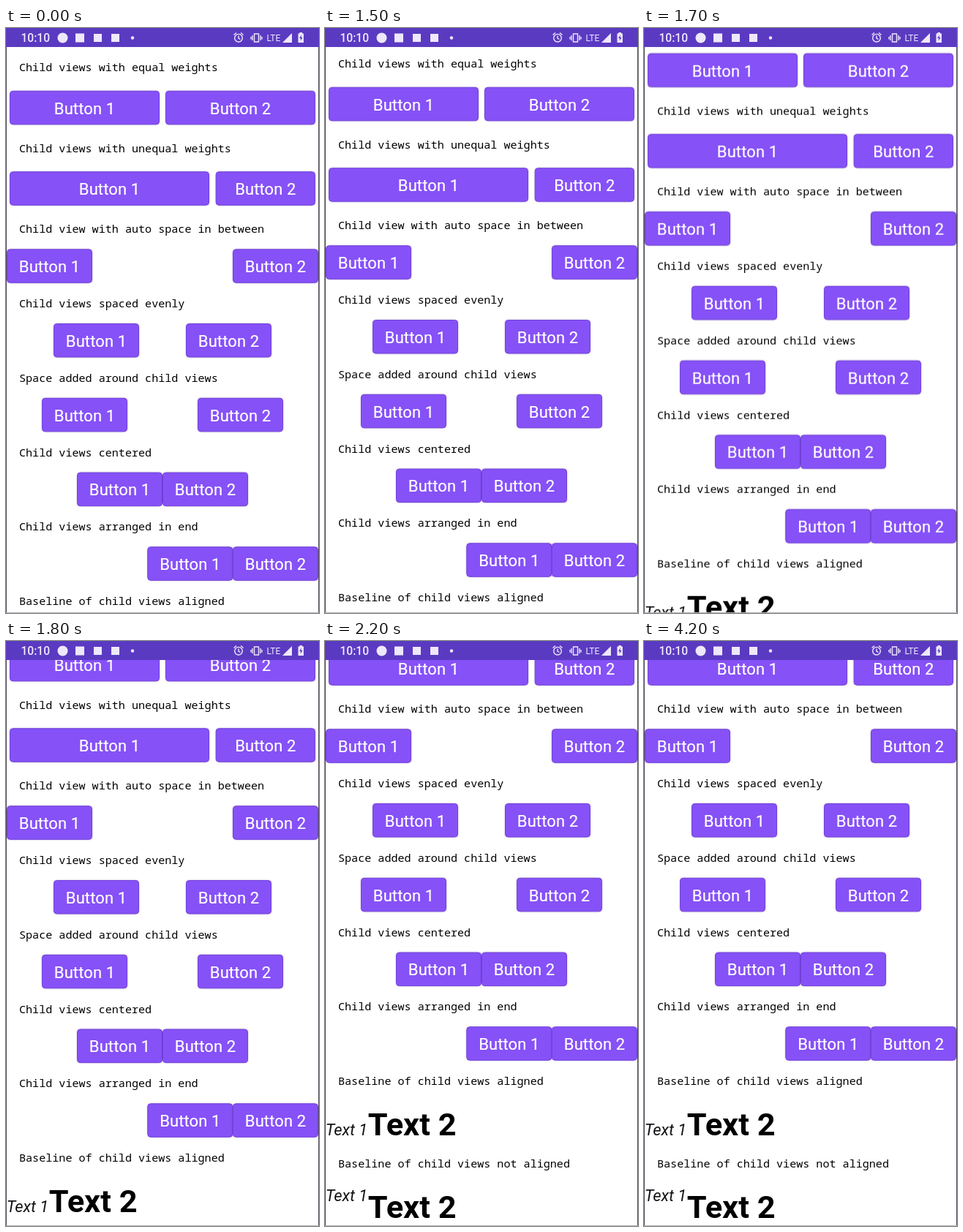
An HTML page that plays this animation: 428x800 px, repeating every 4300 ms.

```html
<!DOCTYPE html>
<html lang="en">
<head>
<meta charset="utf-8">
<title>Row layouts</title>
<style>
html, body { margin: 0; width: 100%; height: 100%; overflow: hidden; background: #fff; }
svg { display: block; }
.label { font: 500 15.1px "Noto Sans Mono", monospace; fill: #000; }
.button rect { fill: #8651f7; stroke: #7241da; filter: drop-shadow(0 .6px .8px rgba(60, 30, 120, .3)); }
.button text { font: 22px Roboto, sans-serif; letter-spacing: .1px; fill: #fff; stroke: #fff; stroke-width: .2; text-anchor: middle; }
.thin { font: italic 21.8px Roboto, sans-serif; fill: #111; }
.bold { font: bold 43.4px Roboto, sans-serif; fill: #000; }
.status { fill: #eee8fb; font-family: Roboto, sans-serif; }
.line { fill: none; stroke: #eee8fb; stroke-width: 1.4; }

#page { animation: scroll 4.3s step-end infinite; }
@keyframes scroll {
  0% { transform: translateY(0); }
  34.8% { transform: translateY(-5px); }
  37.2% { transform: translateY(-25.6px); }
  39.5% { transform: translateY(-51.3px); }
  41.8% { transform: translateY(-77px); }
  44.1% { transform: translateY(-127px); }
  44.1% { transform: translateY(-102px); }
  46.5% { transform: translateY(-127px); }
  48.8% { transform: translateY(-156px); }
  51.1%, 100% { transform: translateY(-182px); }
}
</style>
</head>
<body>
<svg width="428" height="800" viewBox="0 0 428 800">
  <rect width="428" height="800" fill="#fff"/>
  <g id="page"></g>
  <path d="M.5 26V800M427.5 26V800" stroke="#55505c"/>
  <path d="M0 799.5H428" stroke="#b5b2ba"/>

  <rect width="428" height="26" fill="#5b3ac2"/>
  <g class="status">
    <text x="20.5" y="19" font-size="15.6" font-weight="500">10:10</text>
    <circle cx="77.5" cy="13.5" r="7"/>
    <rect x="95" y="7.5" width="12" height="12"/>
    <rect x="120" y="8" width="11" height="11"/>
    <rect x="144" y="8" width="11" height="11"/>
    <circle cx="173" cy="13.5" r="2.2"/>
    <text x="356.5" y="18" font-size="12">LTE</text>
    <path d="M391 7V20H378Z"/>
    <path d="M401.5 7.5V6H405V7.5H407V20H399.5V7.5Z"/>
    <path d="M404 9.5L401 14H403L402.6 17.5L405.6 13H403.6Z" fill="#5b3ac2"/>
  </g>
  <g class="line">
    <circle cx="318" cy="13.7" r="5.3"/>
    <path d="M318 10.5V14L320.5 15.5M311.5 9.5L315 6.5M324.5 9.5L321 6.5"/>
    <path d="M339.5 8H345.5V19H339.5ZM337 10V17M348 10V17M335 12V15.5M350 12V15.5"/>
  </g>
</svg>
<script>
const page = document.getElementById("page");

// label, label baseline, button top, then x and width of each button
const rows = [
  ["Child views with equal weights", 59.3, 85.8, [5, 205], [218, 205]],
  ["Child views with unequal weights", 169.8, 196.2, [5, 273], [286.7, 136.3]],
  ["Child view with auto space in between", 280.3, 302.3, [1, 117], [310, 117]],
  ["Child views spaced evenly", 382, 404, [65, 117], [246, 117]],
  ["Space added around child views", 483.8, 505.8, [49, 117], [262, 117]],
  ["Child views centered", 585.5, 607.6, [97, 117], [214, 117]],
  ["Child views arranged in end", 687.3, 709.3, [193.3, 117], [310, 117]],
  ["Baseline of child views aligned", 789],
  ["Baseline of child views not aligned", 902]
];

const text = (cls, x, y, s) => `<text class="${cls}" x="${x}" y="${y}">${s}</text>`;

const button = (x, y, w, n) => `<g class="button">
  <rect x="${x + .5}" y="${y + .5}" width="${w - 1}" height="45.5" rx="4"/>
  <text x="${x + w / 2}" y="${y + 31.7}">Button ${n}</text></g>`;

const pair = (thinY, boldY) =>
  text("thin", .8, thinY, "Text 1") + text("bold", 58.7, boldY, "Text 2");

page.innerHTML = rows.map(([label, y, top, ...boxes]) =>
  text("label", 18, y, label) +
  boxes.map(([x, w], i) => button(x, top, w, i + 1)).join("")
).join("") + pair(857.5, 857.5) + pair(948, 970.5);
</script>
</body>
</html>
```
